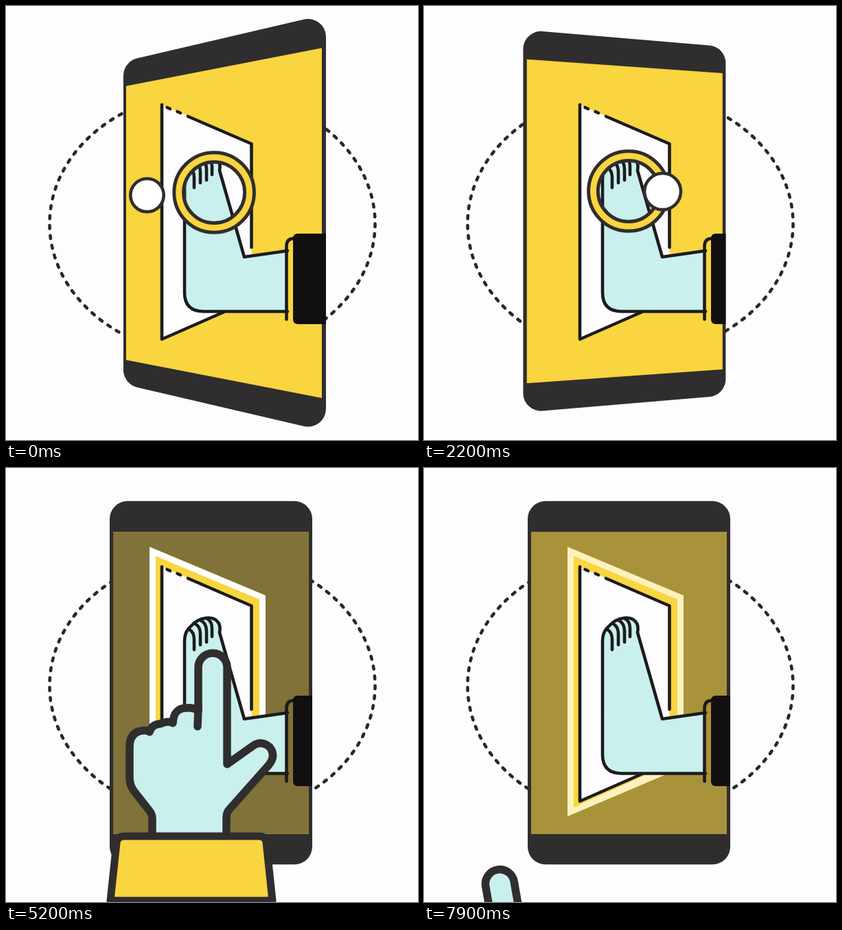
These frames come from a looping animation (600x633 px, 8000 ms). An HTML page with a canvas:

```html
<!DOCTYPE html>
<html lang="en">
<head>
<meta charset="utf-8">
<title>Phone, door and hand</title>
<style>
  html, body { margin: 0; width: 100%; height: 100%; overflow: hidden; background: #fdfcfe; }
  canvas { display: block; width: 600px; height: 633px; }
</style>
</head>
<body>
<canvas id="stage" width="600" height="633"></canvas>
<script>
const ctx = document.getElementById('stage').getContext('2d');
const LOOP = 8000;
const PAPER = '#fdfcfe', INK = '#302d2f', LINE = '#1c1b1e', BLACK = '#120f10';
const YELLOW = '#f9d53f', SKIN = '#c9f0ed', DIM = '#807238';

// Tracks: [time, value]
const TILT = [[0, .253], [150, .258], [1100, -.232], [1300, -.226], [1800, -.185], [2700, .012], [3100, .0235], [3600, 0]];
const DOT_X = [[0, 205.5], [150, 203.5], [1100, 394], [1300, 391], [1800, 373], [2700, 319], [3100, 312], [3600, 300]];
const SCREEN_H = [[0, 455], [1300, 454.5], [3100, 448], [3700, 440.5]];

const clamp = p => Math.max(0, Math.min(1, p));
const ramp = (t, a, b) => clamp((t - a) / (b - a));
const easeInOut = p => p < .5 ? 4 * p ** 3 : 1 - 4 * (1 - p) ** 3;

// Smooth curve through the keys, flat at peaks and ends
function track(keys, t) {
  const last = keys.length - 1;
  if (t >= keys[last][0]) return keys[last][1];
  const i = keys.findIndex(k => k[0] > t) - 1;
  const rate = j => (keys[j + 1][1] - keys[j][1]) / (keys[j + 1][0] - keys[j][0]);
  const slope = j => {
    if (j === 0 || j === last) return 0;
    const a = rate(j - 1), b = rate(j);
    return a * b <= 0 ? 0 : 2 * a * b / (a + b);
  };
  const [t0, v0] = keys[i], [t1, v1] = keys[i + 1];
  const d = t1 - t0, p = (t - t0) / d, q = 1 - p;
  return v0 * (1 + 2 * p) * q * q + v1 * p * p * (3 - 2 * p)
    + d * (slope(i) * p * q * q - slope(i + 1) * p * p * q);
}

function paint(path, fill, stroke, width = 4.6) {
  if (fill) { ctx.fillStyle = fill; ctx.fill(path); }
  if (stroke) { ctx.strokeStyle = stroke; ctx.lineWidth = width; ctx.stroke(path); }
}

function circle(x, y, r) {
  const p = new Path2D();
  p.arc(x, y, r, 0, 7);
  return p;
}

// Upright-sided panel seen at an angle
function panel(cx, cy, w, h, tilt, r) {
  const l = cx - w / 2, right = cx + w / 2, k = tilt * w / 295 / 2;
  const a = h / 2 * (1 - k), b = h / 2 * (1 + k);
  const p = new Path2D();
  p.moveTo(l, cy);
  p.arcTo(l, cy - a, cx, cy - h / 2, r);
  p.arcTo(right, cy - b, right, cy, r);
  p.arcTo(right, cy + b, cx, cy + h / 2, r);
  p.arcTo(l, cy + a, l, cy, r);
  p.closePath();
  return p;
}

const shape = d => new Path2D(d);
const orbit = new Path2D();
orbit.ellipse(300.5, 317.5, 237, 193, 0, 0, Math.PI * 2);

const glowOuter = shape('M209 115 378 186V436L209 508Z');
const glowInner = shape('M218 128.5 369 191.5V427L218 495Z');
const doorFill = shape('M227 144 357.5 201V432L227 486Z');
const doorLines = shape('M227 144V486L318 446M265 161 357.5 201V352M234.500 148 239 150M249.500 154 254 156');
const foot = shape('M410 357 347 366 311 240Q313 229 308 224Q302 217 290 219Q278 221 270 230Q260 238 260 252V418Q260 445.500 288 445.500H410');
const toes = shape('M266 235Q274 239 274 250V265M275 227Q283 231 283 242V258M283 222Q292 226 292 238V254M292 219.500Q300 223 300 234V246');
const cuffEdge = shape('M408.500 457V350Q408.500 339 420 339');
const cuff = shape('M480 332H425Q418 332 418 339V457Q418 464 425 464H480Z');

const hand = shape('M213 538V511Q213 505 209 500L187 472Q180 463 180 452V407Q180 385 199 383Q205 382 209 385Q212 374 225 373Q236 368 243 372Q244 350 263 350Q272 349 280 354V291A21 21 0 0 1 322 291V432L360 405Q372 397 384 407Q394 420 382 434L326 497Q321 502 321 510V538');
const fingerEnd = shape('M280 350 279 377');
const sleeve = shape('M173 537H368Q378 537 379 546L388 631H152L161 547Q162 537 173 537Z');

function drawFoot() {
  paint(foot, SKIN, LINE);
  paint(toes, null, LINE);
}

function drawRing(x, y) {
  const ring = circle(x, y, 58.3);
  ring.addPath(circle(x, y, 44.5));
  ctx.fillStyle = YELLOW;
  ctx.fill(ring, 'evenodd');
  for (const r of [58.3, 44.5]) paint(circle(x, y, r), null, INK, 5);
}

function drawHand(t) {
  if (t < 4000) return;
  const rise = 1 - easeInOut(ramp(t, 4000, 5000));
  const leave = easeInOut(ramp(t, 7200, 8000));
  ctx.save();
  ctx.translate(301 - 9.4 * rise - 192 * leave, 291 + 383 * rise + 318 * leave);
  ctx.rotate(-10 * leave * Math.PI / 180);
  ctx.translate(-301, -291);
  paint(hand, SKIN, INK, 11.5);
  paint(fingerEnd, null, INK, 11.5);
  paint(sleeve, YELLOW, INK, 11);
  ctx.restore();
}

function draw(t) {
  ctx.fillStyle = PAPER;
  ctx.fillRect(0, 0, 600, 633);
  ctx.lineCap = ctx.lineJoin = 'round';

  ctx.setLineDash([4.5, 10.06]);
  paint(orbit, null, '#26292c');
  ctx.setLineDash([]);

  const tilt = track(TILT, t), lean = Math.abs(tilt) / .256;
  const cx = 298.5 + lean, cy = 313.3 + 2.1 * lean + 3.4 * tilt;
  const body = panel(cx + 75 * tilt, cy, 295, 530 + 9.5 * lean, tilt * 1.01, 26);
  const screen = panel(cx + 71 * tilt, cy + .3, 285, track(SCREEN_H, t), tilt, 0);
  const dim = ramp(t, 3700, 4200) * (1 - ramp(t, 7800, 8100));

  paint(body, INK);
  paint(screen, YELLOW);
  if (dim) {
    ctx.globalAlpha = dim;
    paint(screen, DIM);
    ctx.globalAlpha = 1;
    paint(glowOuter, YELLOW);
    ctx.globalAlpha = dim;
    paint(glowOuter, '#fff');
    ctx.globalAlpha = 1;
    paint(glowInner, YELLOW);
  }
  paint(doorFill, PAPER);
  paint(doorLines, null, LINE);
  drawFoot();
  paint(cuffEdge, null, LINE);
  ctx.save();
  ctx.clip(body);
  paint(cuff, BLACK);
  ctx.restore();

  const shown = 1 - ramp(t, 3600, 4000);
  if (shown) {
    const x = track(DOT_X, t), off = Math.abs(x - 302) / 97;
    ctx.globalAlpha = shown;
    drawRing(299.3 + 15 * tilt, 269.7 + 1.6 * lean + 3 * tilt);
    paint(circle(x, 269 + 7 * off * off, 28.5 - 4.3 * off), '#fff', INK);
    ctx.globalAlpha = 1;
  }
  drawHand(t);
}

const start = performance.now();
function tick() {
  draw((performance.now() - start) % LOOP);
  requestAnimationFrame(tick);
}
tick();
</script>
</body>
</html>
```
